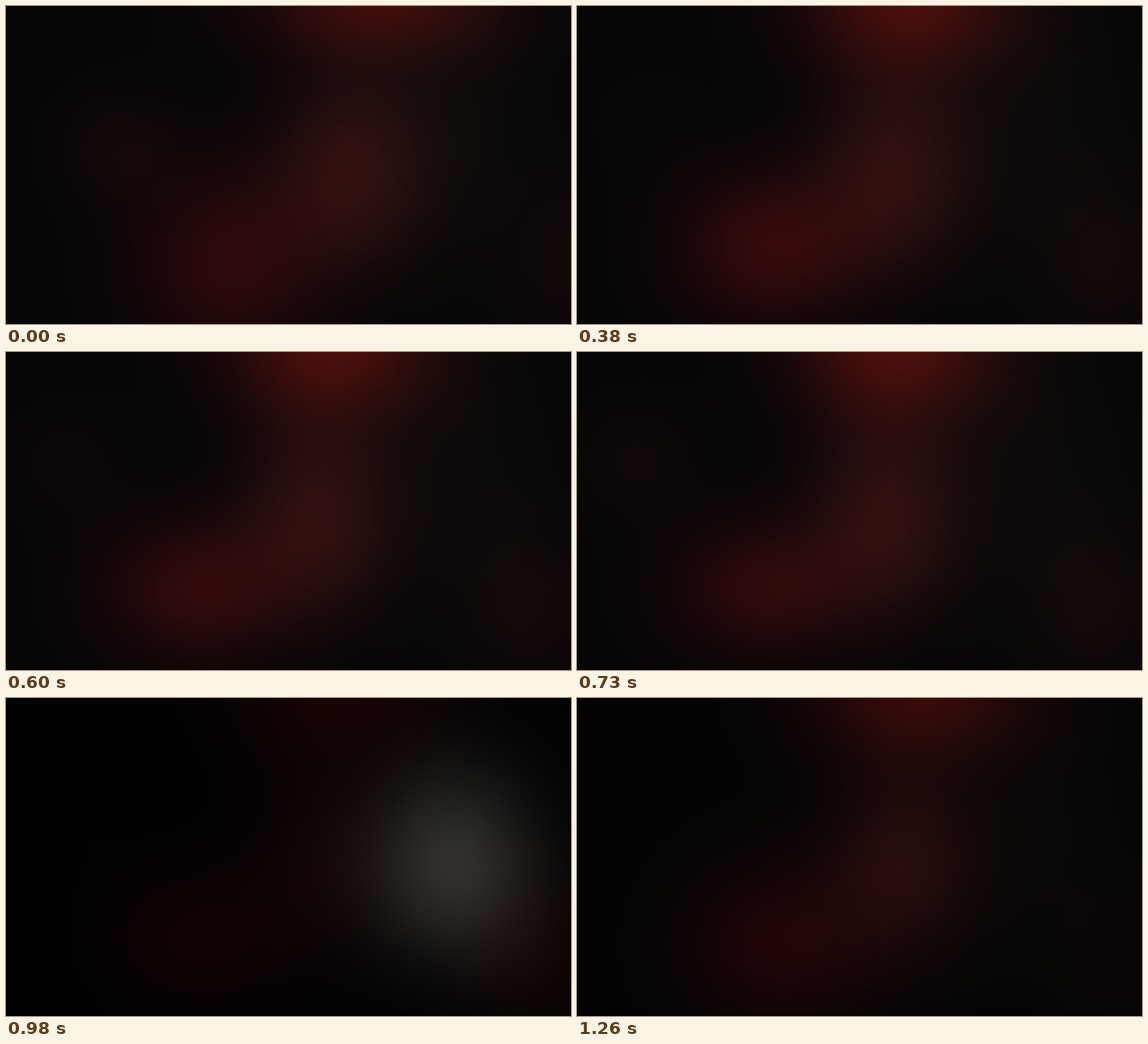
These frames come from a looping animation (998x561 px, 1480 ms). An HTML page with a canvas:

```html
<!DOCTYPE html>
<html lang="en">
<head>
<meta charset="utf-8">
<title>Embers</title>
<style>
  html, body { margin: 0; width: 100%; height: 100%; overflow: hidden; background: #000; }
  canvas { display: block; width: 998px; height: 560px; }
</style>
</head>
<body>
<canvas id="stage" width="250" height="140"></canvas>
<script>
const LOOP = 1480, SCALE = 4;

// Moments at which the picture jumps; it stands still in between.
const STEPS = [0, 320, 380, 480, 520, 560, 600, 730, 790, 920, 980, 1040, 1100, 1230, 1260];

const canvas = document.getElementById("stage");
const ctx = canvas.getContext("2d");
const { width, height } = canvas;
const image = ctx.createImageData(width, height);

// Progress from 0 to 1 between two moments
const ramp = (time, from, to) => Math.min(1, Math.max(0, (time - from) / (to - from)));

// Bell curve sampled along one axis
function bell(count, centre, radius) {
  return Array.from({ length: count }, (_, i) =>
    Math.exp(-((((i + .5) * SCALE - centre) / radius) ** 2)));
}

function glow(x, y, rx, ry, power, green, blue) {
  return {
    cols: bell(width, x, rx),
    rows: bell(height, y, ry),
    colour: [power, power * green, power * blue]
  };
}

function sceneAt(time) {
  // Everything leans left, quickly at first, then partly swings back.
  const sway = .75 * ramp(time, 260, 380) + .25 * ramp(time, 380, 790) - .45 * ramp(time, 790, 1260);
  const flash = Math.max(0, 1 - Math.abs(time - 980) / 120);
  const fade = ramp(time, 1100, 1260);
  const level = 1 - .67 * flash - .2 * fade;
  const ends = (2 * sway - 1) ** 2; // strongest at either end of the sway

  return {
    base: [5, 5, 6].map(c => c * level ** 2),
    glows: [
      // top
      glow(660 - 95 * sway, -15, 215 - 40 * sway, 105 + 30 * sway, (56 + 14 * sway) * level, .13, .11),
      // core
      glow(612 - 66 * sway, 288, 135, 175, 41 * level, .27, .23),
      // ember
      glow(395 - 65 * sway, 455 - 40 * sway, 165, 180 - 60 * sway, (50 - 12 * ends - 14 * fade) * level, .1, .11),
      // corner
      glow(1010 - 90 * sway, 455, 125, 155, 13 - 7 * fade, .25, .2),
      // left
      glow(200 - 100 * sway, 250 - 60 * sway, 110, 105, 13 * ends * level, .3, .25),
      // veil
      glow(820, 220, 160, 260, 7 * level, .85, .5),
      // lamp
      glow(790, 292, 148, 165, 46 * flash, .98, .89)
    ]
  };
}

function draw(time) {
  const { base, glows } = sceneAt(time);
  for (let y = 0, p = 0; y < height; y++) {
    for (let x = 0; x < width; x++, p += 4) {
      let [r, g, b] = base;
      for (const { cols, rows, colour } of glows) {
        const light = cols[x] * rows[y];
        r += light * colour[0];
        g += light * colour[1];
        b += light * colour[2];
      }
      image.data.set([r, g, b, 255], p);
    }
  }
  ctx.putImageData(image, 0, 0);
}

let shown = -1;
const start = performance.now();

function tick() {
  const time = (performance.now() - start) % LOOP;
  const step = STEPS.findLast(s => s <= time);
  if (step !== shown) draw(shown = step);
  requestAnimationFrame(tick);
}
tick();
</script>
</body>
</html>
```
